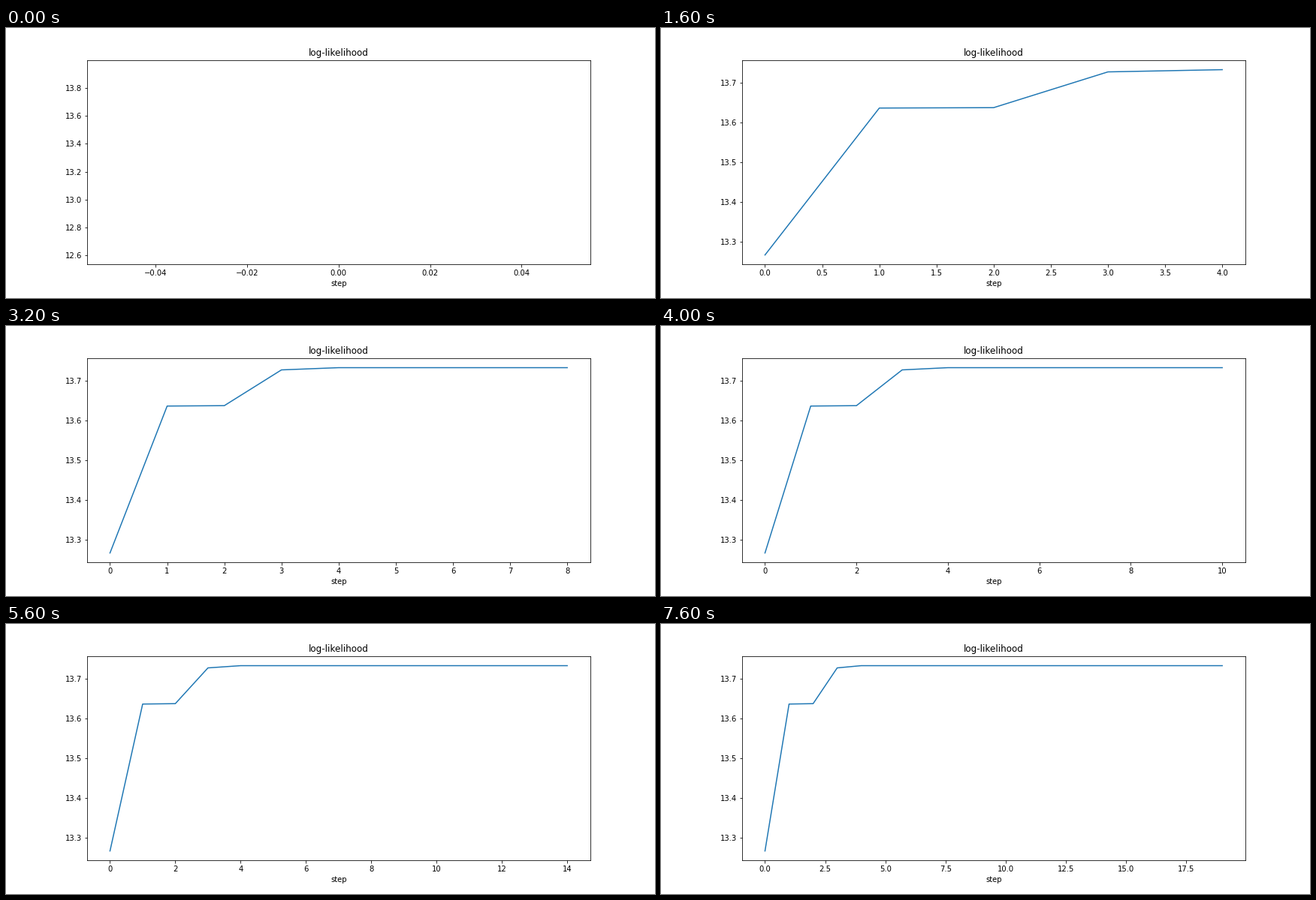
Write a matplotlib script that moves like this. It is 864 px wide and 360 px high and loops after 8 s.

```python
import matplotlib.pyplot as plt
from matplotlib.animation import FuncAnimation

STEPS = 20
INTERVAL = 400  # ms per step
RISE = [13.2673, 13.6367, 13.6377, 13.7276, 13.7332]
likelihood = RISE + [RISE[-1]] * (STEPS - len(RISE))  # converged after the rise

plt.rcParams.update({"font.family": "DejaVu Sans", "font.size": 10})
fig, ax = plt.subplots(figsize=(12, 5), dpi=72, facecolor="white")
fig.subplots_adjust(left=0.125, right=0.9, bottom=0.125, top=0.88)


def draw(step):
    ax.clear()
    ax.plot(range(step + 1), likelihood[:step + 1], color="#1f77b4", lw=1.5)
    ax.set_title("log-likelihood")
    ax.set_xlabel("step")
    return ax.lines


anim = FuncAnimation(fig, draw, frames=STEPS, init_func=lambda: draw(0),
                     interval=INTERVAL, repeat=True, repeat_delay=0)
plt.show()
```
